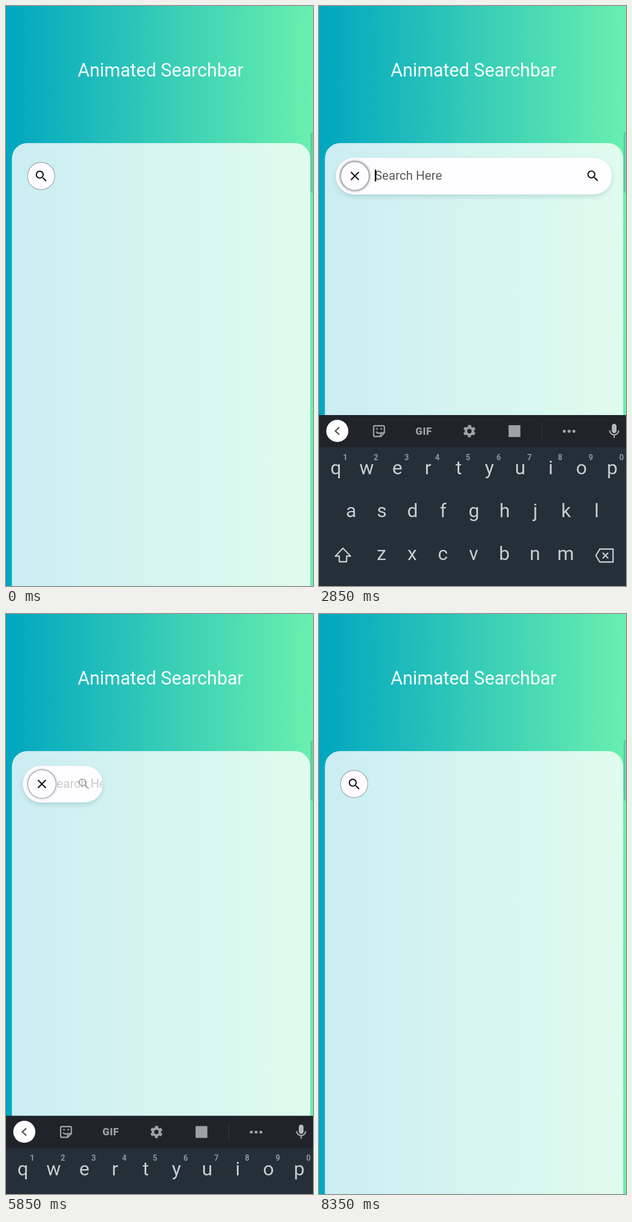
Write an HTML page that moves like this. It is 545 px wide and 1028 px high and loops after 9600 ms.

```html
<!DOCTYPE html>
<html lang="en">
<head>
<meta charset="utf-8">
<title>Animated Searchbar</title>
<style>
  html, body { margin: 0; width: 100%; height: 100%; overflow: hidden; }
  svg { display: block; width: 100%; height: 100%; font-family: Roboto, sans-serif; }
  .line { fill: none; stroke: #9da2a5; stroke-width: 2.4; }
  .keys text { text-anchor: middle; font-size: 34px; fill: #c8cdd1; }
  .keys .digit { font-size: 14px; font-weight: 700; fill: #8d969b; }
</style>
</head>
<body>
<svg viewBox="0 0 545 1028">
  <defs>
    <linearGradient id="sea">
      <stop offset="0" stop-color="#00a6c0"/>
      <stop offset="1" stop-color="#69f0ae"/>
    </linearGradient>
    <filter id="soft" x="-30%" y="-50%" width="160%" height="200%">
      <feGaussianBlur stdDeviation="4"/>
    </filter>
    <filter id="halo" x="-30%" y="-30%" width="160%" height="160%">
      <feGaussianBlur stdDeviation="2"/>
    </filter>
    <clipPath id="barClip"><rect class="barShape" x="30" y="269" width="65" height="65" rx="32.5"/></clipPath>
    <path id="lens" transform="scale(1.1) translate(-11.75 -11.75)" d="M15.5 14h-.79l-.28-.27A6.47 6.47 0 0 0 16 9.5 6.5 6.5 0 1 0 9.5 16c1.61 0 3.09-.59 4.23-1.57l.27.28v.79l5 4.99L20.49 19zm-6 0a4.5 4.5 0 1 1 0-9 4.5 4.5 0 0 1 0 9z"/>
  </defs>

  <rect width="545" height="1028" fill="url(#sea)"/>
  <text x="274.5" y="125" font-size="32.5" fill="#fff" fill-opacity=".96" text-anchor="middle">Animated Searchbar</text>
  <rect x="10.5" y="243" width="529.5" height="820" rx="27" fill="#fff" fill-opacity=".795"/>
  <rect x="541.5" y="224.5" width="9" height="106" rx="4" fill="#5fd7a2" stroke="#579b80" stroke-opacity=".7"/>

  <g id="bar">
    <rect class="barShape" x="30" y="273" width="65" height="65" rx="32.5" fill="#1c5a5a" opacity=".17" filter="url(#soft)"/>
    <rect class="barShape" x="30" y="269" width="65" height="65" rx="32.5" fill="#fefdff"/>
    <g clip-path="url(#barClip)">
      <text id="hint" y="308" font-size="22">Search Here</text>
      <rect id="cursor" y="290" width="2.6" height="21" fill="#111"/>
      <use id="suffix" href="#lens" y="301" fill="#111"/>
    </g>
  </g>

  <g id="button">
    <circle id="glow" r="26.5" fill="#555" filter="url(#halo)"/>
    <circle id="disc" fill="#fefcff" stroke="#9aa6a8" stroke-width="1.2"/>
    <use id="prefix" href="#lens" fill="#111419"/>
    <path id="cross" d="M-7 -7 7 7M7 -7-7 7" fill="none" stroke="#0d0d0f" stroke-width="2.2"/>
  </g>

  <g id="gap">
    <rect y="740" width="545" height="288" fill="#f9f9fb"/>
    <path d="M15.5 770V888" stroke="#f2f3f4"/>
  </g>

  <g id="keyboard">
    <rect width="545" height="420" fill="#252f37"/>
    <rect width="545" height="57" fill="#20232a"/>
    <circle cx="32.5" cy="28.2" r="19.6" fill="#fff"/>
    <path id="chevron" d="M3.5 -6.5-3.5 0 3.5 6.5" fill="none" stroke="#51565a" stroke-width="2.4"/>
    <g id="tools" fill="#9da2a5">
      <g class="line" transform="translate(106.5 28.5)">
        <path d="M-7.5 -9.5H7.5Q9.5 -9.5 9.5 -7.5V3L3 9.5H-7.5Q-9.5 9.5-9.5 7.5V-7.5Q-9.5 -9.5-7.5 -9.5ZM3 9V3H9"/>
        <path d="M-5 -4H-2M2.5 -4H5.5M-5 1Q-2.5 5 1.5 3"/>
      </g>
      <text x="186" y="34.5" font-size="18" font-weight="900" letter-spacing=".6" text-anchor="middle">GIF</text>
      <g class="line" transform="translate(267 28.5)">
        <circle r="6.2" stroke-width="4.6"/>
        <circle r="9.2" stroke-width="3.6" stroke-dasharray="5.2 4.434" transform="rotate(13.8)"/>
      </g>
      <rect x="336.5" y="18" width="21" height="21"/>
      <path d="M395.5 14V43" stroke="#363c43"/>
      <circle cx="435.5" cy="28.8" r="2.7"/><circle cx="444" cy="28.8" r="2.7"/><circle cx="452.5" cy="28.8" r="2.7"/>
    </g>
    <g transform="translate(524 28)">
      <rect x="-4.2" y="-12.5" width="8.4" height="16.5" rx="4.2" fill="#b5b9bc"/>
      <path class="line" d="M-8 -1A8 8 0 0 0 8 -1M0 7V12.5"/>
    </g>
    <g class="keys"></g>
    <path class="line" stroke-linejoin="round" d="M42.5 236 56 250H49V260H36V250H29Z" style="stroke:#c8cdd1"/>
    <g class="line" transform="translate(507 249)" style="stroke:#c8cdd1">
      <path stroke-linejoin="round" d="M-8.5 -11.5H15V11.5H-8.5L-15.5 0Z"/>
      <path d="M-3.5 -5 6.5 5M6.5 -5-3.5 5"/>
    </g>
  </g>
</svg>

<script>
const LOOP = 9600, FRAME = 250 / 3, GROW = 900;
const KEYS_TOP = 725, KEYS_RISE = 275, STAGE_H = 1028;
const cycles = [
  { open: 1786, focus: 1833, close: 3830 },
  { open: 5731, focus: 5750, close: 7330 }
];

const $ = id => document.getElementById(id);
const set = (el, attrs) => { for (const k in attrs) el.setAttribute(k, attrs[k]); };
const show = (el, on) => { el.style.display = on ? "" : "none"; };
const clamp = v => Math.min(1, Math.max(0, v));
const barShapes = document.querySelectorAll(".barShape");

// cubic-bezier(0, 0, .58, 1), solved by bisection
function easeOut(x) {
  let low = 0, high = 1;
  for (let i = 0; i < 24; i++) {
    const s = (low + high) / 2;
    if (1.74 * (1 - s) * s * s + s ** 3 < x) low = s; else high = s;
  }
  return low * low * (3 - 2 * low);
}

function addKey(label, x, y, className = "") {
  const key = document.createElementNS("http://www.w3.org/2000/svg", "text");
  key.textContent = label;
  set(key, { x, y, class: className });
  document.querySelector(".keys").append(key);
}
[["qwertyuiop", 30], ["asdfghjkl", 57], ["zxcvbnm", 111]].forEach(([row, left], r) =>
  [...row].forEach((ch, i) => addKey(ch, left + i * 54.5, 105 + r * 76)));
[..."1234567890"].forEach((d, i) => addKey(d, 46.5 + i * 54.5, 79.5, "digit"));

function keyboardTop(t, cycle, closing) {
  if (closing) return 938 + 2.8 * (t - cycle.close);
  const left = 1 - clamp((t - cycle.open - 30) / KEYS_RISE);
  return KEYS_TOP + (STAGE_H - KEYS_TOP) * left * left;
}

function draw(t) {
  const cycle = cycles.find(c => t >= c.open && t < c.close + GROW + 60);
  const closing = !!cycle && t >= cycle.close;

  show($("bar"), cycle);
  show($("glow"), cycle);
  show($("cross"), cycle && !closing);
  show($("prefix"), !cycle || closing);
  show($("gap"), closing && t < cycle.close + 60);
  show($("keyboard"), cycle);
  set($("button"), { transform: cycle ? "translate(63.7 301.3)" : "translate(62.4 301.4)" });
  set($("disc"), { r: cycle ? 25.2 : 24.2, "stroke-width": closing ? 0.6 : 1.2 });
  if (!cycle) return;

  const phase = easeOut(clamp((t - (closing ? cycle.close : cycle.open)) / GROW));
  const p = closing ? 1 - phase : phase;
  const width = 65 + 425 * p;
  const textX = 72 + 27 * p;
  const opacity = closing ? p : 0.15 + 0.85 * p;

  barShapes.forEach(el => set(el, { width }));
  set($("hint"), { x: textX, opacity, fill: closing ? "#b3b6b7" : "#5b5b5b" });
  set($("suffix"), { x: width - 4, opacity });
  set($("cursor"), { x: textX });
  show($("cursor"), !closing && Math.floor((t - cycle.focus + 5) / 500) % 2 === 0);
  set($("glow"), { opacity: 0.2 + 0.5 * p });

  set($("keyboard"), { transform: `translate(0 ${keyboardTop(t, cycle, closing)})` });
  set($("chevron"), { transform: `translate(32.5 28.2) rotate(${closing ? 180 : 0})` });
  show($("tools"), !closing);
}

function tick() {
  const t = performance.now() % LOOP;
  draw(Math.floor((t + 25) / FRAME) * FRAME);
  requestAnimationFrame(tick);
}
tick();
</script>
</body>
</html>
```
